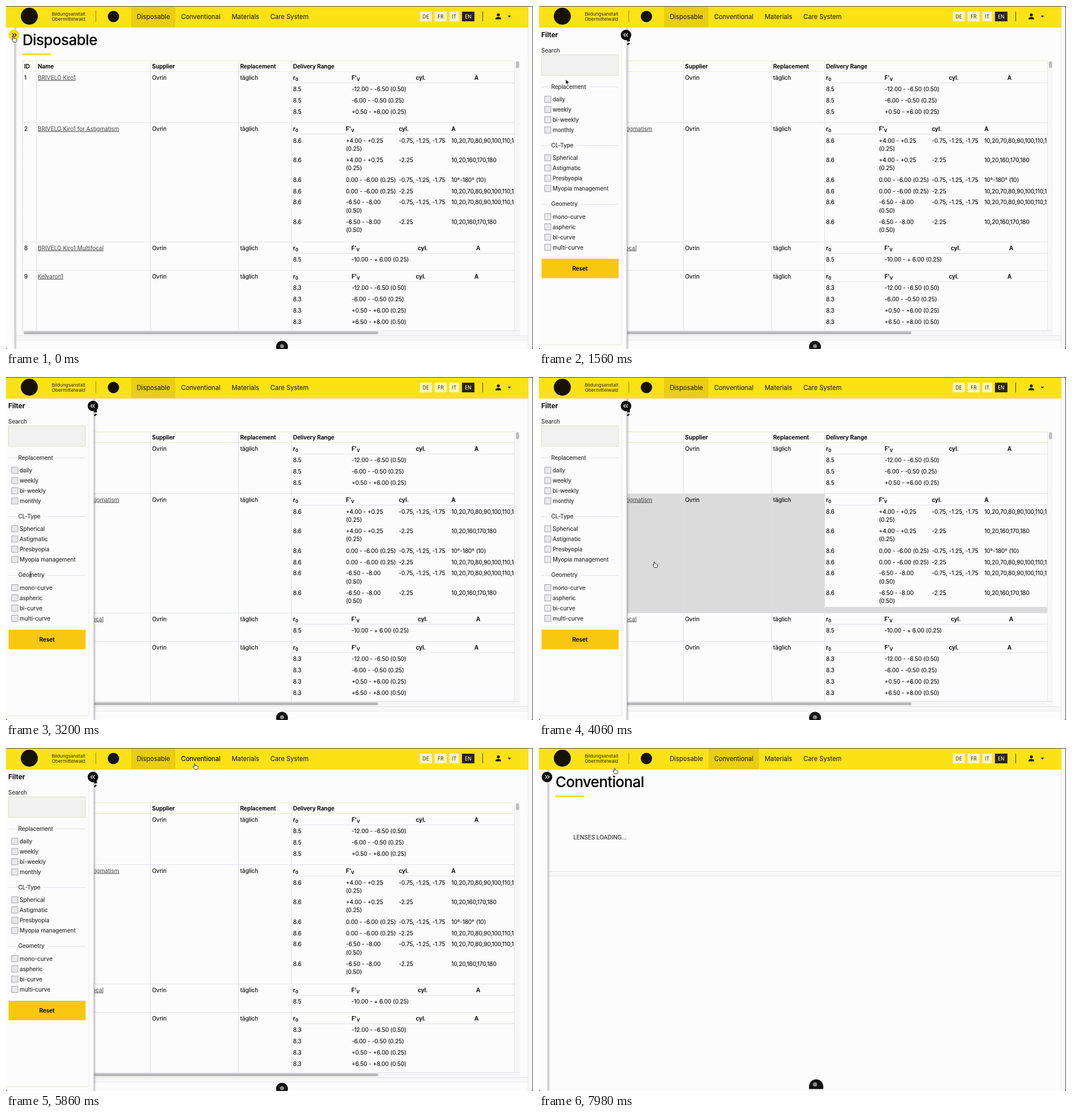
Animation, 927 px wide and 604 px high, one loop 8000 ms. Source, as an HTML page:

```html
<!DOCTYPE html>
<html lang="en">
<head>
<meta charset="utf-8">
<title>Lens catalogue</title>
<style>
html, body { margin: 0; width: 100%; height: 100%; overflow: hidden; background: #fcfcfc; }
svg { display: block; width: 100vw; height: 100vh; }
text { font-family: Inter, "Open Sans", sans-serif; font-size: 9.95px; fill: #050505; stroke: #050505; stroke-width: .12px; white-space: pre; }
.b { font-weight: 600; }
.h1 { font-size: 26px; font-weight: 500; letter-spacing: -.65px; }
.nav { font-size: 11.2px; fill: #2c2707; stroke: #2c2707; }
.nav.on { fill: #000; stroke: #000; }
.link { fill: #555; stroke: #555; text-decoration: underline; }
.org { font-size: 8.2px; fill: #2a2506; stroke: none; }
.lang { font-size: 8.6px; text-anchor: middle; fill: #332f14; stroke: none; }
.lang.on { fill: #fff; }
.side { fill: #262626; stroke: #262626; }
.big { font-size: 12px; }
</style>
</head>
<body>
<svg id="stage" viewBox="0 0 927 604" preserveAspectRatio="none"></svg>
<script>
const LOOP = 8000, FIRST_MOVE = 820;
const LINE = '#dfe1ec', PALE = '#ecebc8';

const rect = (x, y, w, h, fill, more = '') =>
  `<rect x="${x}" y="${y}" width="${w}" height="${h}" fill="${fill}" ${more}/>`;
const hline = (x1, x2, y, c = LINE) => rect(x1, y, x2 - x1, 1, c);
const vline = (x, y1, y2, c = LINE) => rect(x, y1, 1, y2 - y1, c);
const circle = (x, y, r, fill, more = '') => `<circle cx="${x}" cy="${y}" r="${r}" fill="${fill}" ${more}/>`;
// text placed by its left edge and vertical centre
const text = (x, y, s, cls = '', up = 3.6) => `<text x="${x}" y="${y + up}" class="${cls}">${s}</text>`;
const sub = (a, b) => `${a}<tspan font-size="75%" dy="2.2">${b}</tspan>`;
const group = (id, body, more = '') => `<g id="${id}" ${more}>${body}</g>`;

const R0 = sub('r', '0'), FV = sub("F'", 'V');
const AXES = '10,20,70,80,90,100,110,120,160';

// top, bottom, id, name, nested columns, nested lines [y, r0, power, cyl, axis]
const rows = [
  [115, 205, 1, 'BRIVELO Kiro1', [608, 721, 824], [
    [146, '8.5', '-12.00 - -6.50 (0.50)'],
    [166, '8.5', '-6.00 - -0.50 (0.25)'],
    [186, '8.5', '+0.50 - +6.00 (0.25)']]],
  [205, 415, 2, 'BRIVELO Kiro1 for Astigmatism', [598, 691, 783.5], [
    [237, '8.6', '+4.00 - +0.25|(0.25)', '-0.75, -1.25, -1.75', AXES],
    [271, '8.6', '+4.00 - +0.25|(0.25)', '-2.25', '10,20,160,170,180'],
    [306, '8.6', '0.00 - -6.00 (0.25)', '-0.75, -1.25, -1.75', '10°-180° (10)'],
    [326, '8.6', '0.00 - -6.00 (0.25)', '-2.25', AXES],
    [345.5, '8.6', '-6.50 - -8.00|(0.50)', '-0.75, -1.25, -1.75', AXES],
    [380, '8.6', '-6.50 - -8.00|(0.50)', '-2.25', '10,20,160,170,180']]],
  [415, 465, 8, 'BRIVELO Kiro1 Multifocal', [607.5, 724.5, 827], [
    [446, '8.5', '-10.00 - + 6.00 (0.25)']]],
  [465, 571, 9, 'Kelvaron1', [608, 721, 824], [
    [496.5, '8.3', '-12.00 - -6.50 (0.50)'],
    [516.5, '8.3', '-6.00 - -0.50 (0.25)'],
    [536, '8.3', '+0.50 - +6.00 (0.25)'],
    [556, '8.3', '+6.50 - +8.00 (0.50)']]]
];

const tabs = [['Disposable', 220, 298], ['Conventional', 298, 387], ['Materials', 387, 455], ['Care System', 455, 542]];

function rowSvg([top, bottom, id, name, cols, lines], i) {
  const y = top + 11;
  let s = group('hover' + i, rect(29, top + 1, 473, bottom - top - 1, '#dbdbdb') +
    rect(502, bottom - 10, 393, 10, '#dbdbdb'));
  s += text(32, y, id) + text(56, y, name, 'link') + text(257, y, 'Ovrin') + text(412, y, 'täglich');
  s += text(505, y, R0, 'b') + text(cols[0], y, FV, 'b') + text(cols[1], y, 'cyl.', 'b') + text(cols[2], y, 'A', 'b');
  s += hline(503, 895, top + 20);
  for (const [ly, r, power, cyl = '', axis = ''] of lines) {
    s += text(505, ly, r) + text(cols[1], ly, cyl) + text(cols[2], ly, axis);
    power.split('|').forEach((p, k) => s += text(cols[0], ly + k * 14.7, p));
  }
  return s + hline(29, 895, bottom);
}

const footer = y => rect(17, y, 901, 9, '#f7f7f7') + hline(17, 918, y, '#e4e4ec') + hline(17, 918, y + 8, '#e9e9ec');
const heading = s => text(29, 60, s, 'h1', 9.3) + rect(29, 83.5, 50, 3, '#f9e01c');
const scrollbar = end => rect(29, 571, 875, 9, '#f6f6f6') + hline(29, 904, 571) +
  rect(31, 573, end - 31, 5, '#b9b9b9', 'rx="2.5"');

function disposable() {
  let s = footer(580) + heading('Disposable') + hline(29, 895, 96, PALE) + hline(29, 895, 115, PALE);
  [[32, 'ID'], [56, 'Name'], [257, 'Supplier'], [412, 'Replacement'], [505, 'Delivery Range']]
    .forEach(([x, t]) => s += text(x, 106, t, 'b'));
  s += `<g clip-path="url(#table)">${rows.map(rowSvg).join('')}</g>`;
  [29, 53, 254, 409, 502].forEach(x => s += vline(x, 96, 571));
  return s + rect(895, 96, 9, 475, '#f7f7f7') + vline(894, 96, 571, '#e8e8ee') +
    rect(897, 97.5, 5.5, 12, '#bcbcbc', 'rx="2.7"') + scrollbar(655);
}

function conventional() {
  let s = footer(580) + hline(29, 904, 96, PALE) + hline(29, 904, 115, PALE);
  [[32, 'ID'], [48, 'Article'], [171, 'Supplier / Manufacturer'], [295, 'CL-Type'], [388, 'Geometry'],
    [481, R0], [574, FV], [667, sub('Ø', 'T')], [759, 'NE'], [852, 'Flattening']]
    .forEach(([x, t]) => s += text(x, 106, t, 'b'));
  return s + scrollbar(670);
}

function header() {
  let s = rect(0, 0, 919, 37, '#fbe216') + hline(0, 919, 37, '#efda2c') +
    group('active', rect(0, 1, 1, 36, '#e9ce14'));
  s += circle(41, 18, 15, '#151204');
  s += text(80.5, 14, 'Bildungsanstalt', 'org', 3) + text(80.5, 23, 'Obermittelwald', 'org', 3);
  s += vline(157.5, 8, 28, '#8f8110') + circle(189, 18.5, 10, '#151204');
  tabs.forEach(([t, x], i) => s += `<text id="tab${i}" class="nav" x="${x + 10}" y="22.5">${t}</text>`);
  [['DE', 728, 21], ['FR', 754, 21], ['IT', 780, 17], ['EN', 802, 22]].forEach(([t, x, w]) => {
    const on = t === 'EN';
    s += rect(x, 10, w, 17, on ? '#2a250b' : '#fdf7bf');
    s += `<text class="lang ${on ? 'on' : ''}" x="${x + w / 2}" y="21.7">${t}</text>`;
  });
  s += vline(838, 10, 27, '#3d370a') + circle(866, 15.6, 2.6, '#1d1905') +
    '<path d="M861 23.5v-1.3c0-2 3-3 5-3s5 1 5 3v1.3zM882.5 17h6l-3 3.2z" fill="#1d1905"/>';
  return s;
}

function fieldset(y, title, gap, items) {
  let s = hline(4, 17, y) + hline(gap, 140, y) + text(21.5, y, title, 'side');
  items.forEach((t, i) => {
    const cy = y + 22.8 + i * 18;
    s += rect(10, cy - 6, 11, 11, '#e9e9ed', 'stroke="#a3a3a8"') + text(24, cy, t, 'side');
  });
  return s;
}

function sidebar() {
  const body = text(4, 51, 'Filter', 'b big', 4.3) + text(4, 78, 'Search', 'side') +
    rect(4.5, 86, 135, 36, '#f1f1f1', 'stroke="#dedec6"') +
    fieldset(142, 'Replacement', 88, ['daily', 'weekly', 'bi-weekly', 'monthly']) +
    fieldset(245, 'CL-Type', 66, ['Spherical', 'Astigmatic', 'Presbyopia', 'Myopia management']) +
    fieldset(348.7, 'Geometry', 73, ['mono-curve', 'aspheric', 'bi-curve', 'multi-curve']) +
    rect(4.5, 445, 135.5, 34.5, '#f8c711') +
    '<text class="b" x="72" y="466" text-anchor="middle">Reset</text>' +
    vline(145, 38, 596, '#ececec') + hline(0, 145, 596, '#e9e9dc');
  return rect(154, 38, 5, 566, 'url(#shade)') + rect(-10, 38, 164.5, 566, '#fcfcfc') +
    vline(154, 38, 604, '#b9b9c2') + group('filters', body) +
    circle(153, 51, 9.3, '#0b0b0b', 'id="knob"') +
    '<path id="chevrons" d="M149.8 47.8l3.2 3.2-3.2 3.2M153.8 47.8l3.2 3.2-3.2 3.2" fill="none" stroke-width="1.2"/>';
}

const badge = circle(0, 0, 12, '#fff', 'opacity=".8"') + circle(0, 0, 10.5, '#131313') + circle(0, -1, 3.5, '#8b8b8b');
const bigBadge = '<path d="M474.5 601v-5a13 13 0 0 1 26 0v5z" fill="#131313" stroke="#fff" stroke-width=".8"/>' +
  circle(485.5, 592.5, 3.8, '#8b8b8b');

const pointers =
  group('hand', '<path transform="scale(.92)" d="M-1 .6C-1-.8 1-.8 1 .6V3.4C1.6 2.7 2.8 2.9 3 3.7 3.7 3.2 4.7 3.5 4.9 4.3 5.8 4 6.4 4.5 6.4 5.4V7.6C6.4 9 5.4 9.4 5.4 10.4H-.2C-.3 9.2-1.8 8.4-3.2 6-3.6 5-2.3 4.4-1 5.8z" fill="#fff" stroke="#111" stroke-width=".9" stroke-linejoin="round"/>') +
  group('arrow', '<path d="M0 0V8.6L2 6.8 3.4 10 5 9.3 3.6 6.2H6.3z" fill="#0a0a0a" stroke="#fff" stroke-width=".7"/>') +
  group('beam', '<path d="M-2-4.7Q0-4.7 0-3.5 0-4.7 2-4.7M0-3.5V3.5M-2 4.7Q0 4.7 0 3.5 0 4.7 2 4.7M-1 .8H1" fill="none" stroke="#222" stroke-width=".95"/>');

const stage = document.getElementById('stage');
stage.innerHTML = `<defs><clipPath id="table"><rect x="29" y="96" width="865" height="476"/></clipPath>
  <linearGradient id="shade"><stop offset="0" stop-color="#555" stop-opacity=".35"/><stop offset="1" stop-color="#555" stop-opacity="0"/></linearGradient></defs>` +
  rect(0, 0, 927, 604, '#fcfcfc') +
  group('list', disposable()) +
  group('second', heading('Conventional') + group('empty', conventional()) +
    group('loading', text(60.5, 157, 'LENSES LOADING...', 'side') + footer(217))) +
  group('side', sidebar()) +
  rect(918, 1, 8, 603, '#fafafa') + vline(918, 38, 604, '#e6e6e6') + header() +
  group('badge', badge, 'transform="translate(485.5 600)"') + group('bigBadge', bigBadge) +
  hline(0, 927, 0, '#4c4c52') + vline(926, 0, 604, '#4c4c52') +
  '<path d="M0 600.5Q0 604 3.5 604H0zM927 600.5Q927 604 923.5 604H927z" fill="#222"/>' +
  group('pointer', pointers);

const el = id => document.getElementById(id);
const show = (id, on) => el(id).style.display = on ? '' : 'none';

function stepAt(t) {
  if (t < FIRST_MOVE) return -1;
  const d = t - FIRST_MOVE;
  return 3 * Math.floor(d / 140) + Math.min(2, Math.floor(d % 140 / 20));
}

// step, x, y of the pointer's hot spot
const path = [[0, 13, 54], [17, 47, 129], [33, 44, 230], [51, 43, 348], [58, 70, 350], [70, 203, 326],
  [82, 240, 285], [98, 315, 75], [108, 332, 28], [122, 331, 28], [135, 261, 28], [154, 133, 36]];

function pointerAt(step) {
  if (step <= 0) return path[0].slice(1);
  const i = Math.min(path.length - 1, path.findIndex(p => p[0] >= step));
  const [s0, x0, y0] = path[i - 1], [s1, x1, y1] = path[i];
  const k = (step - s0) / (s1 - s0);
  return [x0 + (x1 - x0) * k, y0 + (y1 - y0) * k];
}

function draw(t) {
  const step = stepAt(t), [x, y] = pointerAt(step);
  const second = step >= 116, loading = step >= 146;
  const open = second || t < 270 ? 0 : t < 290 ? .4 : t < 310 ? .8 : 1;
  const inHeader = y < 38;

  show('list', !second);
  show('second', second);
  show('empty', !loading);
  show('loading', loading);
  show('badge', !second);
  show('bigBadge', loading);

  el('side').setAttribute('transform', `translate(${(open - 1) * 139} 0)`);
  show('filters', open > 0);
  const hot = t < 270;
  el('knob').setAttribute('fill', hot ? '#f9dc1a' : '#0b0b0b');
  el('chevrons').setAttribute('stroke', hot ? '#111' : '#fff');
  el('chevrons').setAttribute('transform', open > .5 ? 'rotate(180 153 51)' : '');

  const [, left, right] = tabs[second ? 1 : 0];
  el('active').setAttribute('transform', `translate(${left} 0) scale(${right - left} 1)`);
  tabs.forEach(([, a, b], i) => el('tab' + i).classList.toggle('on', inHeader && x >= a && x < b));

  let onRow = false;
  rows.forEach(([top, bottom], i) => {
    const over = !second && x > 157 && y > top && y <= bottom;
    onRow = onRow || over;
    show('hover' + i, over);
  });

  const onLegend = open === 1 && x > 20 && x < 85 && [142, 245, 349].some(v => Math.abs(y - v) < 7);
  const kind = t < 670 || onRow || inHeader ? 'hand' : onLegend ? 'beam' : 'arrow';
  ['hand', 'arrow', 'beam'].forEach(k => show(k, k === kind));
  el('pointer').setAttribute('transform', `translate(${x.toFixed(1)} ${y.toFixed(1)})`);
}

const start = performance.now();
function tick() {
  draw((performance.now() - start) % LOOP);
  requestAnimationFrame(tick);
}
draw(0);
requestAnimationFrame(tick);
</script>
</body>
</html>
```
